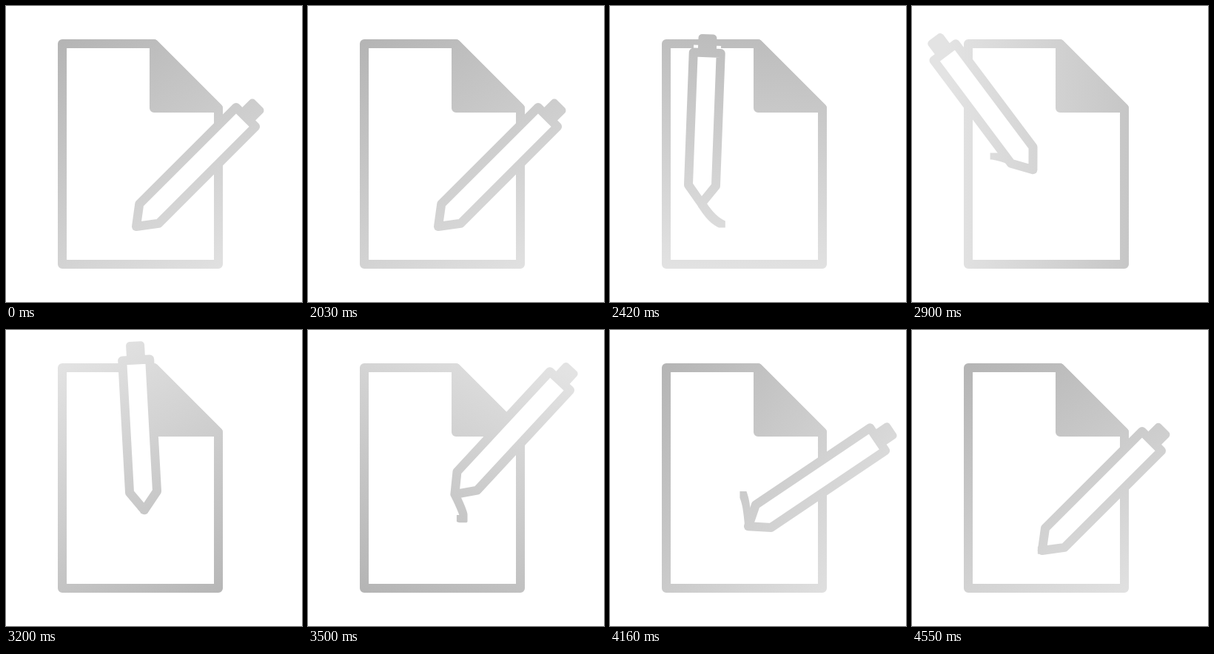
An HTML page that plays this animation: 400 by 400 pixels, repeating every 4580 ms.

```html
<!DOCTYPE html>
<html lang="en">
<head>
<meta charset="utf-8">
<title>Writing pen</title>
<style>
  html, body { margin: 0; width: 100%; height: 100%; overflow: hidden; background: #fff; }
  svg { display: block; width: 100vw; height: 100vh; }
</style>
</head>
<body>
<svg viewBox="0 0 400 400">
  <defs>
    <linearGradient id="shade" gradientUnits="userSpaceOnUse">
      <stop offset="0" stop-color="#b4b4b4"/>
      <stop offset="1" stop-color="#e3e3e3"/>
    </linearGradient>
  </defs>
  <g fill="none" stroke="url(#shade)" stroke-width="12" stroke-linejoin="round">
    <path d="M76 51H200L287 138V349H76Z"/>
    <path d="M200 51V138H287Z" fill="url(#shade)"/>
    <path id="trail" fill="url(#shade)" stroke="none"/>
    <path id="paper" fill="#fff" stroke="none"/>
    <path id="body"/>
    <path id="cap" fill="url(#shade)" stroke-width="10"/>
  </g>
</svg>
<script>
const LOOP = 4580, START = 2030, STEP = 30, LAG = 170, NIB = 9;

// Scribble: tip x, tip y and lean in degrees, evenly spaced in time
const scribble = [
  [176, 298, 45], [158, 298, 31], [133, 280, 9], [103, 230, -13],
  [106, 203, -23], [159, 219, -37], [185, 240, -25], [188, 244, 0],
  [211, 254, 28], [189, 205, 49], [170, 191, 57], [175, 209, 61],
  [184, 238, 59], [187, 287, 53], [175, 297, 47], [176, 298, 45]
];
const last = scribble.length - 1;

const el = id => document.getElementById(id);
const put = (id, attrs) => {
  for (const k in attrs) el(id).setAttribute(k, attrs[k]);
};
const rad = deg => deg * Math.PI / 180;
const smooth = u => u * u * (3 - 2 * u);

// Mirrored ends let the pen start and stop gently
const key = i => scribble[last - Math.abs(last - Math.abs(i))];

function pose(t) {
  const pos = Math.max(0, (t - START) / (LOOP - START) * last);
  const i = Math.floor(pos), u = pos - i, v = 1 - u;
  const [p, a, b, n] = [i - 1, i, i + 1, i + 2].map(key);
  return a.map((from, c) =>
    from + (b[c] - from) * smooth(u)
    + u * v * (v * (b[c] - p[c]) - u * (n[c] - from)) / 2);
}

// The ink is a square nib dragged along the scribble
function ink(t) {
  let d = '';
  for (let s = Math.max(START, t - LAG); s <= t; s += 2) {
    const [x, y] = pose(s);
    d += `M${(x - NIB / 2).toFixed(2)} ${(y - NIB / 2).toFixed(2)}h${NIB}v${NIB}h${-NIB}z`;
  }
  return d;
}

function drawPen([x, y, lean]) {
  const sin = Math.sin(rad(lean)), cos = Math.cos(rad(lean));
  const len = 203.5 + 0.13 * lean, half = 18.5, neck = 24.5;
  // w runs across the pen, h up from the tip
  const shape = (...pts) => 'M' + pts.map(([w, h]) =>
    `${(x + w * cos + h * sin).toFixed(2)} ${(y + w * sin - h * cos).toFixed(2)}`).join('L') + 'Z';
  const barrel = top => shape([0, 0], [-half, neck], [-half, top], [half, top], [half, neck]);

  put('body', { d: barrel(len) });
  put('paper', { d: barrel(len + 10) });
  put('cap', { d: shape([-7.5, len + 5], [-7.5, len + 20], [7.5, len + 20], [7.5, len + 5]) });
}

// The shading makes one eased turn, a little lighter on the first half
function drawShade(t) {
  const u = Math.max(0, (t - START) / (LOOP - START));
  const spin = 360 * smooth(u ** 0.88), dir = rad(58 + spin);
  const mid = -56 * Math.max(0, Math.sin(rad(spin)));
  const gx = Math.cos(dir), gy = Math.sin(dir);
  put('shade', {
    x1: 200 + gx * (mid - 200), y1: 200 + gy * (mid - 200),
    x2: 200 + gx * (mid + 200), y2: 200 + gy * (mid + 200)
  });
}

function draw(now) {
  const ms = now % LOOP;
  const t = START + Math.max(0, Math.floor((ms - START) / STEP) * STEP);
  drawPen(pose(t));
  drawShade(t);
  put('trail', { d: ink(t) });
}

const begin = performance.now();
function tick() {
  draw(performance.now() - begin);
  requestAnimationFrame(tick);
}
tick();
</script>
</body>
</html>
```
